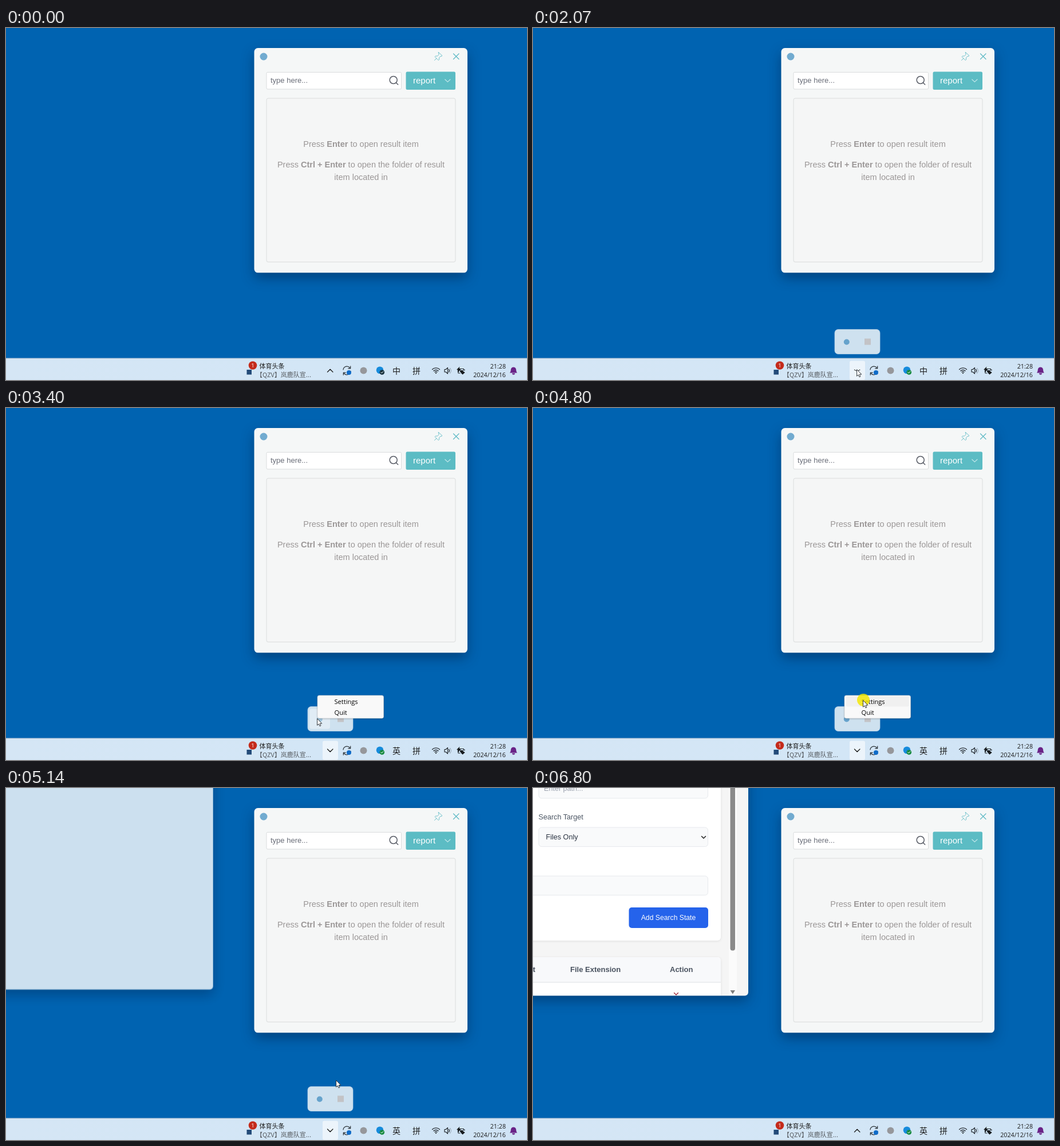
Recreate the animation shown at these times as an HTML page. Size 910 by 616 pixels, loop 6970 ms.

```html
<!DOCTYPE html>
<html lang="en">
<head>
<meta charset="utf-8">
<title>Opening the settings from the tray</title>
<style>
html, body { margin: 0; width: 100%; height: 100%; overflow: hidden; background: #0063b1; }
svg { display: block; width: 910px; height: 616px; font-family: "Liberation Sans", Arial, sans-serif; }
.ui { font-family: "Open Sans", "Noto Sans", sans-serif; }
.cjk { font-family: "Noto Sans CJK SC", "Noto Sans CJK", sans-serif; }
.line { fill: none; stroke-linecap: round; stroke-linejoin: round; }
.field { fill: #f9fafb; stroke: #e7e9ed; }
.float { filter: drop-shadow(0 9px 11px rgba(0, 10, 40, .36)); }
.card { fill: #fff; filter: drop-shadow(0 1px 2px rgba(0, 0, 0, .09)); }

/* One shared timeline, held between keyframes */
.anim { animation: 6970ms step-end infinite; }
.off { opacity: 0; }

#settings { transform-origin: 16px 93px; animation-name: open; }
@keyframes open {
  72.45% { opacity: .51; transform: scale(.9); }
  73.74% { opacity: .8; transform: scale(.96); }
  74.89% { opacity: .95; transform: scale(.99); }
  76.03% { opacity: 1; transform: none; }
  100% { opacity: 1; transform: none; }
}
#page { fill: #fff; animation-name: page; }
@keyframes page { 82.35%, 100% { fill: #f5f5f5; } }
#content { animation-name: content; }
@keyframes content { 83.21%, 100% { opacity: 1; } }

#tray { animation-name: tray; }
@keyframes tray {
  28.55% { opacity: .75; transform: translateY(17px); }
  29.69% { opacity: 1; transform: translateY(5px); }
  30.84% { opacity: 1; transform: translateY(1px); }
  31.99% { opacity: 1; transform: none; }
  91.82% { opacity: 1; transform: translateY(4px); }
  92.96% { opacity: 1; transform: translateY(14px); }
  94.11% { opacity: 1; transform: translateY(30px); }
  95.26% { opacity: 1; transform: translateY(48px); }
  96.41%, 100% { opacity: 0; }
}
#trayHover { animation-name: trayHover; }
@keyframes trayHover { 40.31% { opacity: .38; } 58.24% { opacity: 0; } }

#arrowHover { animation-name: arrowHover; }
@keyframes arrowHover { 20.18% { opacity: .5; } 21.35% { opacity: 1; } 96.41% { opacity: .4; } 97.56% { opacity: 0; } }
#arrow { transform-origin: 566px 599.5px; animation-name: arrow; }
@keyframes arrow {
  28.55% { transform: scaleY(.4); }
  29.69% { transform: scaleY(-.5); }
  30.84% { transform: scaleY(-1); }
  94.11% { transform: scaleY(-.4); }
  95.26%, 100% { transform: none; }
}
#badge { animation-name: badge; }
@keyframes badge { 24.82%, 100% { fill: #16893f; } }
#imeA { animation-name: imeA; }
@keyframes imeA { 46.34% { opacity: 0; } 100% { opacity: 0; } }
#imeB { animation-name: imeB; }
@keyframes imeB { 46.34%, 100% { opacity: 1; } }

#menu { animation-name: menu; }
@keyframes menu { 46.34% { opacity: .45; } 47.48% { opacity: .85; } 48.78% { opacity: 1; } 72.45% { opacity: 0; } }
#menuHover { animation-name: menuHover; }
@keyframes menuHover { 60.54%, 100% { opacity: 1; } }
#chosen { animation-name: chosen; }
@keyframes chosen { 72.45% { opacity: .66; } 73.74% { opacity: 0; } }

#click { animation-name: click; }
@keyframes click {
  24.82% { opacity: .82; transform: translate(565px, 597px); }
  28.55% { opacity: 0; }
  43.9% { opacity: .82; transform: translate(544px, 543px); }
  46.34% { opacity: 0; }
  68.86% { opacity: .82; transform: translate(577px, 511px); }
  72.45% { opacity: 0; }
  86.8% { opacity: .82; transform: translate(596px, 57px); }
  91.82% { opacity: 0; }
}
#cursor { animation-name: cursor; }
@keyframes cursor {
  9.46% { opacity: 1; transform: translate(457px, 232px); }
  10.61% { opacity: 1; transform: translate(489px, 440px); }
  11.9% { opacity: 1; transform: translate(504px, 545px); }
  15.49% { opacity: 1; transform: translate(504px, 545px); animation-timing-function: steps(7, start); }
  23.7% { opacity: 1; transform: translate(565px, 597px); }
  30.84% { opacity: 1; transform: translate(565px, 597px); animation-timing-function: steps(7, start); }
  39.16% { opacity: 1; transform: translate(590px, 534px); }
  39.15% { opacity: 1; transform: translate(640px, 545px); }
  40.31% { opacity: 1; transform: translate(543px, 543px); }
  53.65% { opacity: 1; transform: translate(543px, 543px); animation-timing-function: steps(9, start); }
  63.99% { opacity: 1; transform: translate(576px, 511px); }
  85.65% { opacity: 1; transform: translate(596px, 57px); }
  92.96%, 100% { opacity: 0; transform: translate(596px, 57px); }
}
</style>
</head>
<body>
<svg viewBox="0 0 910 616">
  <defs>
    <linearGradient id="bar" x2="1" y2="0">
      <stop stop-color="#d5e6f5"/><stop offset=".6" stop-color="#d3e6f6"/><stop offset="1" stop-color="#cfe3f5"/>
    </linearGradient>
    <clipPath id="frame"><path d="M-400-300H376V357a6 6 0 0 1-6 6H-400z"/></clipPath>
  </defs>
  <rect width="910" height="616" fill="#0063b1"/>

  <g id="settings" class="anim off">
    <g class="float"><rect id="page" class="anim" x="-344" y="-177" width="720" height="540.5" rx="6"/></g>
    <g id="content" class="anim off" clip-path="url(#frame)">
      <rect class="card" x="-320" y="-160" width="648" height="427" rx="6"/>
      <g class="field">
        <rect x="10" y="-16" width="295.5" height="34" rx="5"/>
        <rect x="10" y="69" width="295.5" height="33.5" rx="5"/>
        <rect x="-300" y="154" width="605.5" height="33.5" rx="5"/>
      </g>
      <g font-size="12.6">
        <text x="19" y="5" fill="#9ca3af">Enter path...</text>
        <text x="9.5" y="55" fill="#4b5563">Search Target</text>
        <text x="22.5" y="90" fill="#2b3442">Files Only</text>
      </g>
      <path class="line" d="M294.5 84.5l3.5 3.5 3.5-3.5" stroke="#222" stroke-width="1.5"/>
      <rect x="167.500" y="209" width="138.5" height="36" rx="5" fill="#2563eb"/>
      <text x="236.500" y="231" font-size="12.2" text-anchor="middle" fill="#fff">Add Search State</text>
      <rect class="card" x="-320" y="296" width="648" height="100" rx="6"/>
      <path d="M-320 340V296H322a6 6 0 0 1 6 6V340z" fill="#f8f9fb"/>
      <path d="M-320 340H328" stroke="#dcdfe3"/>
      <g font-size="13" font-weight="700" fill="#4a5360">
        <text x="4" y="322" text-anchor="end">Target</text>
        <text x="65" y="322">File Extension</text>
        <text x="239" y="322">Action</text>
      </g>
      <path class="line" d="M246.500 358.500l7 7m0-7l-7 7" stroke="#9b2335" stroke-width="1.3"/>
      <rect x="342" y="-160" width="14" height="524" fill="#fbfbfb"/>
      <rect x="344.500" y="-100" width="8.5" height="384.500" rx="4" fill="#8a8a8a"/>
      <path d="M344.500 354h8.500l-4.200 6.500z" fill="#7d7d7d"/>
    </g>
  </g>

  <g id="search">
    <rect class="float" x="433.500" y="35" width="372.500" height="393.300" rx="6.500" fill="#f5f7f7"/>
    <circle cx="450" cy="50" r="6.500" fill="#71abd0"/>
    <g class="line" stroke="#5fbac6">
      <path d="M755.500 42.500l6.500 6-2 1.200-1.200-.2-2.300 2.700.2 3-1.500 1.300-6-6 1.200-1.500 3.200.1 2.500-2.500-.4-1.600zM751.800 53.300l-3.300 3.200" stroke-width=".9"/>
      <path d="M781.500 45l9.500 9.500m0-9.500l-9.500 9.500" stroke-width="1.300"/>
    </g>
    <rect x="455" y="77.500" width="235.500" height="29.500" rx="2" fill="#fff" stroke="#d9dcdd"/>
    <text x="462" y="96.300" font-size="13" fill="#6a6e79">type here...</text>
    <g class="line" stroke="#575b65" stroke-width="1.500">
      <circle cx="676.700" cy="91" r="6.500"/><path d="M681.500 96l3.200 3"/>
    </g>
    <rect x="698.500" y="76.500" width="86.500" height="31.500" rx="2.500" fill="#5cbcc4"/>
    <text x="711" y="97" font-size="15" fill="#fff">report</text>
    <path class="line" d="M766.800 90l4.600 4.300 4.600-4.300" stroke="#c8e9ec" stroke-width="1.100"/>
    <rect x="455" y="123" width="330" height="286.500" rx="3" fill="#f5f6f6" stroke="#dadddd"/>
    <g font-size="14.500" text-anchor="middle" fill="#9b9797">
      <text x="620" y="207.500">Press <tspan font-weight="700">Enter</tspan> to open result item</text>
      <text x="620" y="244">Press <tspan font-weight="700">Ctrl + Enter</tspan> to open the folder of result</text>
      <text x="620" y="265.500">item located in</text>
    </g>
  </g>

  <g id="tray" class="anim off">
    <rect x="527" y="522.500" width="79" height="43" rx="6" fill="#cee1ef" stroke="#bfd6e8" stroke-width=".7"/>
    <circle cx="547.800" cy="544.500" r="5" fill="#66a3cc"/>
    <rect x="579" y="538.500" width="11" height="11" fill="#c3c3c6"/>
    <rect id="trayHover" class="anim off" x="530" y="526.500" width="36" height="35" rx="4" fill="#fff"/>
  </g>

  <g id="taskbar">
    <rect y="578" width="910" height="38" fill="url(#bar)"/>
    <path d="M0 578H910" stroke="#adbccb"/>
    <rect x="420.500" y="598" width="8.500" height="8.500" fill="#234b79"/>
    <circle cx="431" cy="590.500" r="7.300" fill="#c42b1c"/>
    <text class="ui" x="431" y="594" font-size="9.500" text-anchor="middle" fill="#fff">1</text>
    <g class="cjk" font-size="11">
      <text x="442.500" y="596" fill="#1c1c1c">体育头条</text>
      <text x="437" y="610.500" fill="#55595e">【QZV】岚鹿队宣...</text>
    </g>

    <rect id="arrowHover" class="anim off" x="553" y="582.500" width="27" height="33.500" rx="3" fill="#ecf4fb"/>
    <path id="arrow" class="anim line" d="M561.500 602l4.700-4.700 4.700 4.700" stroke="#1d1d1d" stroke-width="1.300"/>

    <g class="line" stroke="#2d3338" stroke-width="1.200">
      <path d="M589 598a6.500 6.500 0 0 1 11.500-3.500m1.200-2.700v4h-4M602 600.500a6.500 6.500 0 0 1-11.500 4m-1.200 2.700v-4h4"/>
    </g>
    <circle cx="599" cy="603" r="4" fill="#0f6cc9"/>
    <circle cx="624.500" cy="599.500" r="6" fill="#96979b"/>
    <circle cx="653" cy="598.800" r="6.300" fill="#168bdc"/>
    <circle id="badge" class="anim" cx="656.800" cy="602.500" r="4.300" fill="#17313d"/>
    <path class="line" d="M654.800 602.500l1.500 1.500 2.700-2.800" stroke="#fff"/>
    <g class="cjk" font-size="14" fill="#1a1a1a">
      <text id="imeA" class="anim" x="675" y="604.500">中</text>
      <text id="imeB" class="anim off" x="675" y="604.500">英</text>
      <text x="710" y="604.500">拼</text>
    </g>

    <g class="line" stroke="#20262b" stroke-width="1.200">
      <path d="M744.500 597.500a9.300 9.300 0 0 1 13 0M746.800 600a6 6 0 0 1 8.400 0M748.900 602.200a3 3 0 0 1 4.200 0"/>
      <path d="M766 597.500h2.300l3.200-3v10.500l-3.200-3h-2.300zM773.500 597.500a3.500 3.500 0 0 1 0 4.500"/>
      <path d="M775.500 595.500a6 6 0 0 1 0 8.500" stroke="#9aabb8"/>
      <path d="M790 596.500h9.500v2.500m-9.500 5h3m-3-7.500q-1.500 4 0 7.500M799.500 598.500h2"/>
    </g>
    <circle cx="751" cy="604" r="1.100" fill="#20262b"/>
    <path d="M787 598l5.500-5.500-1 4.500h3l-5 6 .8-4.500zM793 599h5.500v3H793zM797.500 606.500l-3.500-3.500q1.500-3 3.500-.8 2.500-2.200 4 .8z" fill="#15191c"/>
    <g class="ui" font-size="10.700" text-anchor="end" fill="#1a1a1a">
      <text x="873" y="596">21:28</text>
      <text x="873" y="610.500">2024/12/16</text>
    </g>
    <path d="M880 603.500q1.800-2 1.800-5.500a4.600 4.600 0 0 1 9.200 0q0 3.500 1.800 5.500zM884 604.300h5a2.500 2.500 0 0 1-5 0z" fill="#6a2387"/>
  </g>

  <g id="menu" class="anim off ui" font-size="11.100">
    <rect x="544" y="503" width="115.500" height="40" rx="3" fill="#f9f9f9" stroke="#c9cdd1" stroke-width=".7" style="filter:drop-shadow(0 1px 1px rgba(0,0,0,.2))"/>
    <rect id="menuHover" class="anim off" x="547" y="504.500" width="109.500" height="18" rx="2" fill="#f0f0f0"/>
    <text x="573.500" y="517.800">Settings</text>
    <text x="573.500" y="536.500">Quit</text>
  </g>
  <g id="chosen" class="anim off ui" font-size="11.100">
    <rect x="545" y="504" width="113" height="18.500" fill="#f3f3f3"/>
    <text x="573.500" y="517.800">Settings</text>
  </g>

  <circle id="click" class="anim off" r="11" fill="#f4e800"/>
  <path id="cursor" class="anim off" d="M.6.600V12.300L3.200 9.900 5 13.800 6.900 13 5.200 9.100H8.800z" fill="#fff" stroke="#20242a" stroke-width=".9" stroke-linejoin="round"/>
</svg>
</body>
</html>
```
